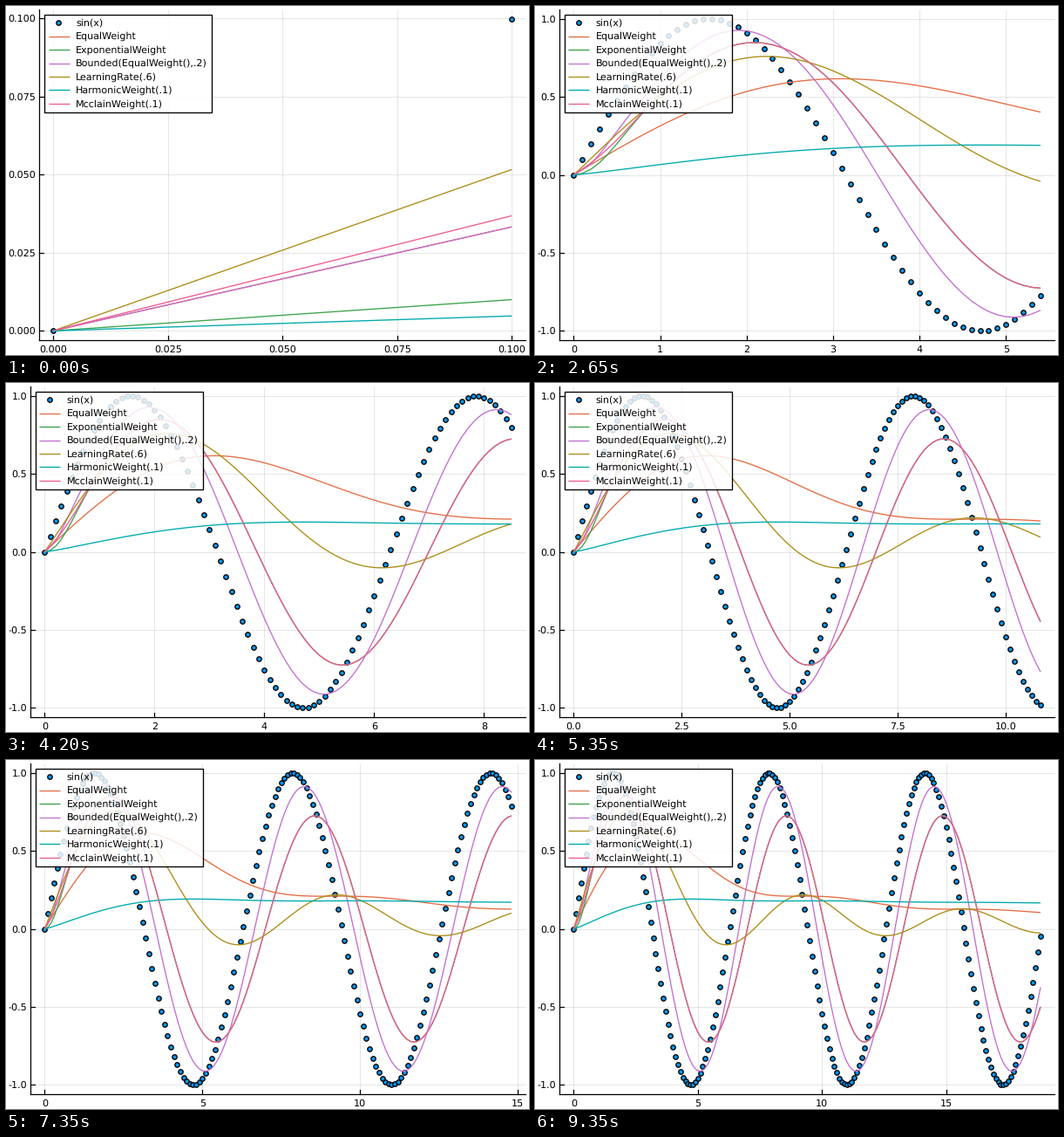
A matplotlib script that plays this animation: 600x400 px, repeating every 9400 ms.

```python
import math
import numpy as np
import matplotlib
import matplotlib.pyplot as plt
from matplotlib.animation import FuncAnimation
from matplotlib.collections import LineCollection
from matplotlib.patches import Rectangle
from matplotlib.transforms import Affine2D

W, H, DPI = 600, 400, 100
FRAMES, INTERVAL = 188, 50
PT = 72 / DPI
EM = 8 / PT
TOP, BOTTOM, RIGHT = 4.2, 383, 596
PAD = 0.03

matplotlib.rcParams["font.family"] = "DejaVu Sans"
matplotlib.rcParams["font.size"] = 8
matplotlib.rcParams["text.hinting"] = "none"
matplotlib.rcParams["path.simplify"] = False

MARKER = "#009AFA"
SERIES = [
    ("EqualWeight", "#E36F47"),
    ("ExponentialWeight", "#3EA44E"),
    ("Bounded(EqualWeight(),.2)", "#C371D2"),
    ("LearningRate(.6)", "#AC8E18"),
    ("HarmonicWeight(.1)", "#00AAAE"),
    ("McclainWeight(.1)", "#ED5E93"),
]


def running_means(data):
    """Weighted means; every step feeds in the whole series so far again."""
    means = np.zeros(len(SERIES))
    rows = [means.copy()]
    n, mcclain = 1, 1.0
    for end in range(2, len(data) + 1):
        for value in data[:end]:
            n += 1
            mcclain /= 1 + mcclain - 0.1
            gain = np.array([1 / n, 0.1, max(1 / n, 0.2), n ** -0.6,
                             0.1 / (n - 0.9), mcclain])
            means += gain * (value - means)
        rows.append(means.copy())
    return np.array(rows).T


def nice_ticks(lo, hi):
    """Best tick step by count, coverage and roundness; returns ticks, labels."""
    span = hi - lo
    order = math.ceil(math.log10(span))
    best = None
    for z in range(order, order - 4, -1):
        for q, nice in ((1, 1), (5, 0.9), (2, 0.7), (2.5, 0.5), (3, 0.2)):
            step = q * 10.0 ** z
            first, last = math.ceil(lo / step), math.floor(hi / step)
            count = last - first + 1
            if not 4 <= count <= 8:
                continue
            score = ((1 - abs(count - 5) / 5) / 4 + nice / 4
                     + 0.5 * span / ((count - 1) * step))
            if (count + 1) * step >= 2 * span:
                score -= 1000
            key = (round(score, 9), z, -count)
            if best is None or key > best[0]:
                best = key, step, first, last
    _, step, first, last = best
    digits = next(d for d in range(9) if abs(round(step, d) - step) < 1e-9)
    ticks = [i * step for i in range(first, last + 1)]
    return ticks, [f"{t:.{digits}f}" for t in ticks]


def text_width(text):
    return EM * sum({".": 0.318, "-": 0.361}.get(c, 0.636) for c in text)


def padded(lo, hi):
    extra = PAD * (hi - lo)
    return lo - extra, hi + extra


xs = np.arange(FRAMES + 1) / 10
ys = np.sin(xs)
means = running_means(ys)

fig = plt.figure(figsize=(W / DPI, H / DPI), dpi=DPI, facecolor="white")
ax = fig.add_axes([0, 0, 1, 1])
ax.set_xlim(0, W)
ax.set_ylim(H, 0)
ax.axis("off")

grid = LineCollection([], colors="black", alpha=0.1, linewidths=0.7, zorder=1)
frame = LineCollection([], colors="black", linewidths=0.9, zorder=2,
                       capstyle="projecting")
ax.add_collection(grid)
ax.add_collection(frame)

DOT = dict(marker="o", ls="none", ms=5.4 * PT, mfc=MARKER, mec="black",
           mew=1.35 * PT)
LINE = dict(lw=1.35 * PT, solid_capstyle="butt")

dots, = ax.plot([], [], zorder=3, **DOT)
curves = [ax.plot([], [], color=c, zorder=4, **LINE)[0] for _, c in SERIES]
x_texts = [ax.text(0, 0, "", ha="center", va="baseline") for _ in range(8)]
y_texts = [ax.text(0, 0, "", ha="right", va="baseline") for _ in range(8)]

# The legend is laid out from its own left edge and slides with the axis.
slide = Affine2D()
place = slide + ax.transData
ax.add_patch(Rectangle((0, 9.5), 192, 112.5, fc=(1, 1, 1, 0.85), ec="black",
                       lw=0.95, transform=place, zorder=5))
for row, (name, color) in enumerate([("sin(x)", MARKER)] + SERIES):
    y = 19.2 + 15.45 * row
    if row:
        ax.plot([4.5, 28.5], [y, y], color=color, transform=place, zorder=6,
                **LINE)
    else:
        ax.plot([16.3], [y], transform=place, zorder=6, **DOT)
    ax.text(35.8, y + 3.4, name, transform=place, va="baseline", zorder=6)
ax.set_xlim(0, W)
ax.set_ylim(H, 0)


def fill(texts, labels, spots):
    for i, t in enumerate(texts):
        t.set_text(labels[i] if i < len(labels) else "")
        if i < len(labels):
            t.set_position(spots[i])


def update(i):
    n = i + 2
    x_lo, x_hi = padded(0, xs[n - 1])
    y_lo, y_hi = padded(min(ys[:n].min(), means[:, :n].min()),
                        max(ys[:n].max(), means[:, :n].max()))
    x_ticks, x_labels = nice_ticks(x_lo, x_hi)
    y_ticks, y_labels = nice_ticks(y_lo, y_hi)
    left = max(map(text_width, y_labels)) + 6.6

    def px(x):
        return left + (np.asarray(x) - x_lo) / (x_hi - x_lo) * (RIGHT - left)

    def py(y):
        return BOTTOM - (np.asarray(y) - y_lo) / (y_hi - y_lo) * (BOTTOM - TOP)

    tx, ty = px(x_ticks), py(y_ticks)
    grid.set_segments([[(x, TOP), (x, BOTTOM)] for x in tx]
                      + [[(left, y), (RIGHT, y)] for y in ty])
    frame.set_segments([[(left, TOP), (left, BOTTOM)],
                        [(left, BOTTOM), (RIGHT, BOTTOM)]]
                       + [[(x, BOTTOM), (x, BOTTOM - 5)] for x in tx]
                       + [[(left, y), (left + 5, y)] for y in ty])

    # A label that would run off the stage is dropped.
    x_labels = [s if x + text_width(s) / 2 < W else ""
                for s, x in zip(x_labels, tx)]
    fill(x_texts, x_labels, [(x, 397) for x in tx])
    fill(y_texts, y_labels, [(left - 4, y + 4) for y in ty])

    u = px(xs[:n])
    dots.set_data(u, py(ys[:n]))
    for curve, m in zip(curves, means):
        curve.set_data(u, py(m[:n]))
    slide.clear().translate(left + 5.7, 0)
    return []


anim = FuncAnimation(fig, update, frames=FRAMES, interval=INTERVAL,
                     init_func=lambda: update(0), repeat=True, repeat_delay=0,
                     blit=False)
plt.show()
```
